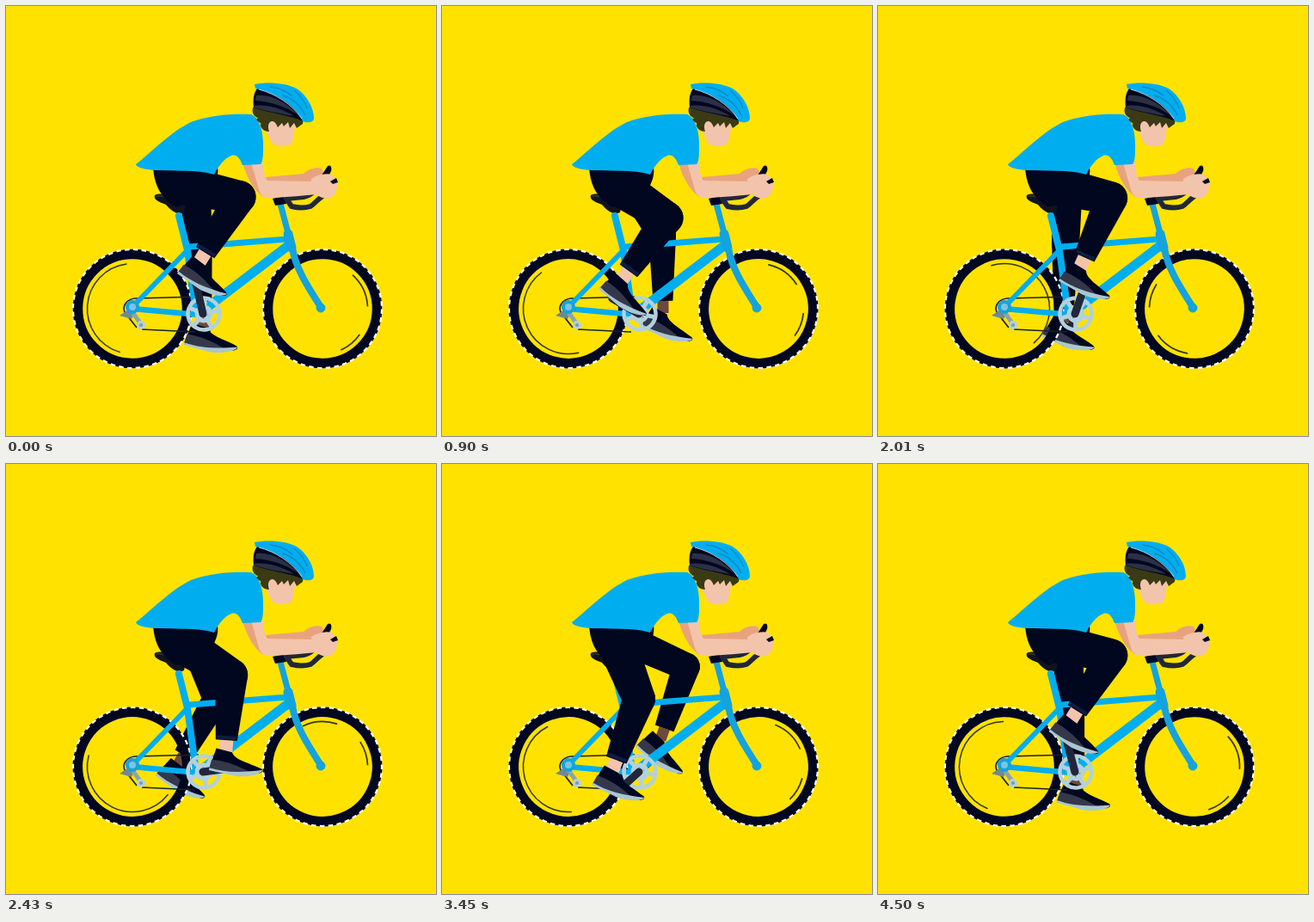
Animation of 500x500 px, one loop 4.53 s. Source, as an HTML page:

```html
<!DOCTYPE html>
<html lang="en">
<head>
<meta charset="utf-8">
<title>Cyclist</title>
<style>
html, body { margin: 0; width: 100%; height: 100%; overflow: hidden; background: #ffe200; }
svg { display: block; width: 100vw; height: 100vh; }
.ink { fill: #020720; }
.blue { fill: #00aeef; }
.steel { fill: #14a3de; stroke: #14a3de; }
.skin { fill: #f2c4ac; }
.tan { fill: #e8a37e; }
.tube { fill: none; stroke: #00aeef; stroke-linecap: round; stroke-linejoin: round; }
.thin { fill: none; stroke: #33331c; stroke-linecap: round; }
.bar { fill: none; stroke: #22263a; stroke-linecap: round; stroke-linejoin: round; }
</style>
</head>
<body>
<svg viewBox="0 0 500 500">
  <defs>
    <g id="tyre">
      <circle r="63.5" fill="none" stroke="#020720" stroke-width="11.5"/>
      <circle r="69" fill="none" stroke="#fff" stroke-width="2.2" stroke-dasharray="5.5 4.35"/>
    </g>
    <g id="shoe">
      <path class="ink" d="M-10 7 L9 7 C14 15 31 14 46 17 C50 18 50 20 46 23 L20 31 L-12 32 Z"/>
      <path fill="#34384a" d="M-12 21 C2 19 16 20 29 23 L38 25 L20 31 L-12 32 Z"/>
      <path fill="#a9c6d2" d="M-12 31 C6 32 24 28 49 18 C47 25 32 31 20 33 L-12 34 Z"/>
    </g>
  </defs>
  <rect width="500" height="500" fill="#ffe200"/>

  <path id="farCrank" class="bar" stroke-width="8"/>
  <g id="farLeg">
    <path class="ankle" stroke="#6b4a3c" stroke-width="13"/>
    <use class="foot" href="#shoe"/>
    <path class="thigh ink"/>
    <path class="shin ink"/>
  </g>

  <g id="rear"><use href="#tyre"/></g>
  <g id="front"><use href="#tyre"/></g>

  <path fill="#11141d" d="M173 220 C180 216 197 221 210 226 L207 240 C200 244 192 238 186 231 C178 228 171 225 173 220 Z"/>
  <path fill="none" stroke="#30303a" stroke-width="2" d="M175 221 C184 219 190 224 199 226"/>

  <g fill="none" stroke="#1a1f30" stroke-width="1.7">
    <path d="M224 338 L150 340 C140 341 135 349 138 356 L152 374 M158 376 L220 379"/>
  </g>
  <path fill="#708990" d="M132 360 L141 354 L149 358 L146 364 Z"/>
  <path fill="none" stroke="#8aa5ae" stroke-width="5" d="M147 356 L157 370"/>

  <g class="tube">
    <path stroke-width="6" d="M211 284 L147 350"/>
    <path stroke-width="6.5" d="M147 352 L224 359"/>
    <path stroke-width="8" d="M201 244 L211 284 L221 357"/>
    <path stroke-width="7" d="M213 280 L328 271"/>
    <path stroke-width="11" d="M329 278 L228 355"/>
    <g stroke="#14a3de">
      <path stroke-width="7" d="M319 230 L328 264"/>
      <path stroke-width="11" d="M328 265 L332 281"/>
      <path stroke-width="8" d="M333 282 C337 304 348 322 366 350"/>
    </g>
  </g>
  <circle class="steel" cx="366" cy="351" r="5"/>
  <circle class="steel" cx="147" cy="350" r="7.5"/>
  <circle cx="147" cy="350" r="4" fill="#7cc4e0"/>
  <circle cx="157" cy="371" r="5" fill="#b3d1dc"/>
  <circle cx="157" cy="371" r="2" fill="#7e9aa5"/>

  <g id="ring" fill="none" stroke="#b3d1dc"></g>
  <path id="nearCrank" class="bar" stroke-width="9"/>

  <path class="ink" d="M171 186 L246 188 C248 200 240 216 230 222 L198 234 C178 222 172 206 171 186 Z"/>
  <g id="nearLeg">
    <path class="ankle" stroke="#f2c4ac" stroke-width="16"/>
    <use class="foot" href="#shoe"/>
    <path class="thigh ink"/>
    <path class="shin ink"/>
    <path class="cuff" stroke="#101d42" stroke-width="4"/>
  </g>

  <path class="tan" d="M302 199 L346 195 C352 189 360 187 367 189 L371 198 L356 205 L304 206 Z"/>
  <path class="ink" d="M310 224 L323 221 L326 230 L313 232 Z"/>
  <path class="bar" stroke-width="6" d="M326 224 L332 233 C340 235 348 235 354 233 C359 230 362 225 367 222 M326 224 L346 222 C352 221 355 219 358 215"/>
  <path class="tan" d="M275 182 L289 182 L299 222 C288 214 280 200 275 182 Z"/>
  <path class="skin" d="M285 182 L299 182 C300 192 300 198 304 203 L357 204 L361 219 C340 221 318 223 304 223 C297 222 295 218 293 210 Z"/>
  <path class="ink" d="M367 197 L374 186 C378 184 379 188 378 192 L374 200 Z"/>
  <path class="skin" d="M355 201 C362 196 372 194 379 196 L384 202 C387 210 384 218 378 223 C368 226 359 219 356 213 Z"/>
  <path class="ink" d="M377 204 L384 200 L386 205 L380 207 Z"/>
  <path class="blue" d="M151 184 C165 174 190 147 215 135 C240 126 265 125 285 126 C296 130 300 150 299 168 C299 176 298 182 296 184 L275 185 C272 177 268 172 262 174 C254 177 247 186 242 196 C222 190 196 192 172 191 C162 190 152 188 151 184 Z"/>

  <path class="skin" d="M300 130 L340 133 C333 143 336 155 331 161 C322 165 311 163 308 158 C307 150 299 147 300 130 Z"/>
  <path fill="#3b3a14" d="M287 118 C285 126 290 129 294 131 C290 130 291 134 296 136 C295 142 300 146 306 146 C304 140 305 134 310 134 C314 135 315 139 316 141 L321 136 L323 140 L328 135 L330 142 L335 136 L338 142 L345 137 L346 130 L300 117 Z"/>
  <path class="ink" d="M293 95 C314 98 335 112 346 134 C330 127 308 125 288 118 C287 108 288 100 293 95 Z"/>
  <path fill="#2b3044" d="M291 104 C308 102 326 112 340 127 C324 116 306 111 290 110 Z M289 116 C304 114 322 120 335 128 C320 125 304 123 289 118 Z"/>
  <path class="blue" d="M289 91 C302 88 326 89 338 96 C350 104 358 118 358 131 C357 136 350 136 345 134 C336 115 314 101 290 96 Z"/>
  <path fill="none" stroke="#1687c4" stroke-width="1.4" d="M307 94 C316 95 325 98 333 105 M321 104 C333 107 342 115 348 127 M335 98 C343 105 348 112 350 119"/>
  <path fill="none" stroke="#e8f4f8" stroke-width=".8" d="M294 97 C314 102 333 115 344 131"/>
</svg>
<script>
const LOOP = 4530;
const SHAFT = [229, 358];
const CRANK = 36;
const THIGH = 70, SHIN = 81;

// Columns: time in ms, crank angle clockwise from the top, wheel turn
const ride = [
  [0, -13, 0], [900, 300, 331], [1560, 310, 382], [2010, 379, 507],
  [2850, 504, 812], [3450, 588, 1060], [4500, 705, 1446]
];
// Columns: crank angle, ankle x, ankle y, foot tilt
const nearSteps = [
  [19, 238, 297, 32], [80, 256, 325, 15], [144, 232, 355, 0], [228, 201, 349, 28],
  [300, 214, 312, 42], [310, 223, 303, 40], [347, 229, 291, 37]
];
const farSteps = [
  [0, 240, 294, 45], [48, 257, 312, 43], [120, 257, 348, 28], [130, 252, 346, 27],
  [167, 228, 365, 17], [199, 216, 359, 26], [264, 204, 342, 38], [324, 231, 311, 56]
];

const $ = id => document.getElementById(id);
const rad = d => d * Math.PI / 180;
const polar = (r, deg) => [r * Math.cos(rad(deg)), r * Math.sin(rad(deg))];
const mod = (a, n) => ((a % n) + n) % n;
const fix = v => v.toFixed(2);

// Smooth curves through the rows, repeated with a given step on both sides
function track(rows, step) {
  const shift = k => rows.map(r => r.map((v, i) => v + k * step[i]));
  const all = [...shift(-1), ...rows, ...shift(1)];
  const slope = (i, c) => (all[i + 1][c] - all[i][c]) / (all[i + 1][0] - all[i][0]);
  const tangent = (i, c) => {
    const a = slope(i - 1, c), b = slope(i, c);
    return a * b > 0 ? 2 * a * b / (a + b) : 0;
  };
  return x => {
    let i = rows.length - 1;
    while (all[i + 1][0] <= x) i++;
    const p = all[i], q = all[i + 1], w = q[0] - p[0], u = (x - p[0]) / w;
    return p.slice(1).map((v, k) => {
      const c = k + 1, d = q[c] - v;
      return v + d * u * u * (3 - 2 * u)
        + w * u * (1 - u) * (tangent(i, c) * (1 - u) - tangent(i + 1, c) * u);
    });
  };
}

const motion = track(ride, [LOOP, 720, 1457]);
const nearAnkle = track(nearSteps, [360, 0, 0, 0]);
const farAnkle = track(farSteps, [360, 0, 0, 0]);

function arc(r, from, to) {
  const [x, y] = polar(r, from), [u, v] = polar(r, to);
  return `M${fix(x)} ${fix(y)}A${r} ${r} 0 0 1 ${fix(u)} ${fix(v)}`;
}

function addArc(wheel, width, from, to) {
  wheel.insertAdjacentHTML("beforeend",
    `<path class="thin" stroke-width="${width}" d="${arc(52.5, from, to)}"/>`);
}

// Tapered limb with round or flat ends
function limb([ax, ay], [bx, by], ra, rb, flat) {
  const len = Math.hypot(bx - ax, by - ay);
  const nx = (by - ay) / len, ny = (ax - bx) / len;
  const pt = (x, y, r) => `${fix(x + nx * r)} ${fix(y + ny * r)}`;
  const end = flat ? "L" : `A${rb} ${rb} 0 0 1 `;
  return `M${pt(ax, ay, ra)}L${pt(bx, by, rb)}${end}${pt(bx, by, -rb)}`
    + `L${pt(ax, ay, -ra)}A${ra} ${ra} 0 0 1 ${pt(ax, ay, ra)}Z`;
}

function bendKnee(hip, ankle) {
  const dx = ankle[0] - hip[0], dy = ankle[1] - hip[1], d = Math.hypot(dx, dy);
  const k = Math.max(1, d / (THIGH + SHIN)), l = THIGH * k, s = SHIN * k;
  const a = (l * l - s * s + d * d) / (2 * d);
  const h = Math.sqrt(Math.max(0, l * l - a * a));
  return [hip[0] + (dx * a + dy * h) / d, hip[1] + (dy * a - dx * h) / d];
}

function makeLeg(id, hip, hipR, kneeR, cuffR, ankleAt) {
  const part = name => $(id).querySelector("." + name);
  const [thigh, shin, ankle, foot] = ["thigh", "shin", "ankle", "foot"].map(part);
  const cuff = part("cuff");
  return angle => {
    const [x, y, tilt] = ankleAt(mod(angle, 360));
    const knee = bendKnee(hip, [x, y]);
    const len = Math.hypot(x - knee[0], y - knee[1]);
    const ux = (x - knee[0]) / len, uy = (y - knee[1]) / len;
    const hem = [x - ux * 5, y - uy * 5];
    thigh.setAttribute("d", limb(hip, knee, hipR, kneeR));
    shin.setAttribute("d", limb(knee, hem, kneeR, cuffR, true));
    ankle.setAttribute("d", `M${fix(hem[0])} ${fix(hem[1])}L${fix(x + ux * 9)} ${fix(y + uy * 9)}`);
    foot.setAttribute("transform", `translate(${fix(x)} ${fix(y)}) rotate(${fix(tilt)})`);
    if (cuff) {
      const cx = hem[0] - ux * 3, cy = hem[1] - uy * 3, r = cuffR - 1;
      cuff.setAttribute("d",
        `M${fix(cx - uy * r)} ${fix(cy + ux * r)}L${fix(cx + uy * r)} ${fix(cy - ux * r)}`);
    }
  };
}

function setCrank(id, angle) {
  const [x, y] = polar(CRANK, angle - 90);
  $(id).setAttribute("d", `M${SHAFT}L${fix(SHAFT[0] + x)} ${fix(SHAFT[1] + y)}`);
}

addArc($("rear"), 1.5, 106, 262);
addArc($("front"), 1.7, -48, -4);
addArc($("front"), 1.7, 35, 65);

let spokes = "";
for (let i = 0; i < 5; i++) {
  const [x, y] = polar(18, i * 72);
  spokes += `M0 0L${fix(x)} ${fix(y)}`;
}
$("ring").innerHTML = `<circle r="18.5" stroke-width="4.5"/>
  <circle r="8" stroke-width="5"/><path d="${spokes}" stroke-width="5"/>`;

const moveNear = makeLeg("nearLeg", [203, 208], 23, 19, 12.5, nearAnkle);
const moveFar = makeLeg("farLeg", [220, 207], 18, 16, 11.5, farAnkle);

function draw(t) {
  const [pedal, turn] = motion(t);
  $("rear").setAttribute("transform", `translate(147 352) rotate(${fix(turn)})`);
  $("front").setAttribute("transform", `translate(368 352) rotate(${fix(turn)})`);
  $("ring").setAttribute("transform", `translate(230 358) rotate(${fix(pedal)})`);
  setCrank("nearCrank", pedal);
  setCrank("farCrank", pedal + 180);
  moveNear(pedal);
  moveFar(pedal + 180);
}

const start = performance.now();
function tick(now) {
  draw(mod(now - start, LOOP));
  requestAnimationFrame(tick);
}
draw(0);
requestAnimationFrame(tick);
</script>
</body>
</html>
```
